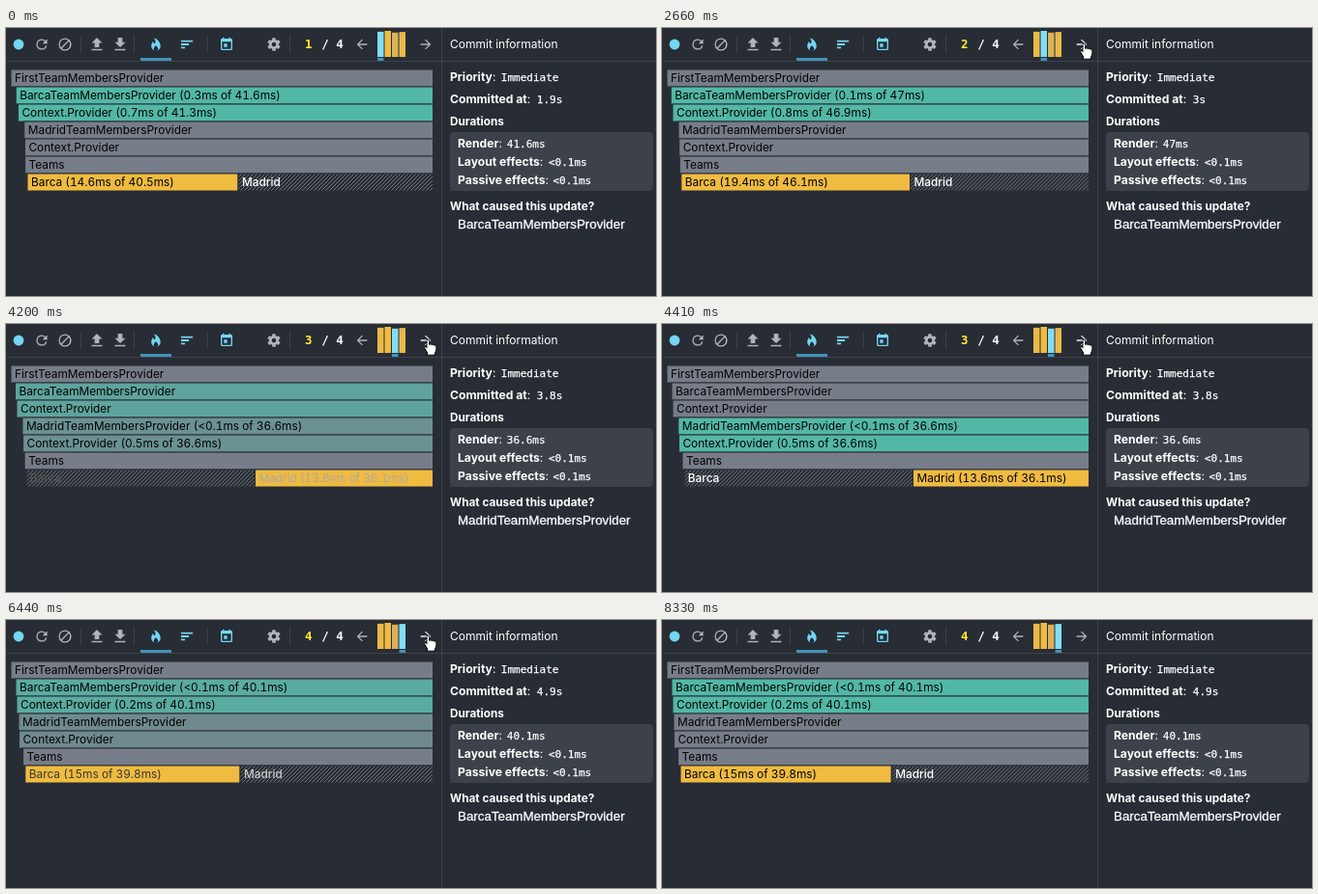
Animation, 672 px wide and 278 px high, one loop 8.68 s. Source, as an HTML page:

```html
<!DOCTYPE html>
<html lang="en">
<head>
<meta charset="utf-8">
<title>Profiler commits</title>
<style>
html, body { margin: 0; width: 100%; height: 100%; overflow: hidden; background: #282c34; }
svg { display: block; }
text { font-family: Inter, Roboto, sans-serif; font-size: 12px; fill: #fff; white-space: pre; }
.row { font-size: 11.83px; font-variant-numeric: tabular-nums; }
.head { font-size: 11.75px; font-weight: 700; }
.key { font-size: 12.15px; font-weight: 700; }
.colon { font-weight: 400; }
.m { font-family: "DejaVu Sans Mono", monospace; font-size: 11px; stroke: #fff; stroke-width: .25; }
.num { font-family: "DejaVu Sans Mono", monospace; font-size: 12.5px; font-weight: 700; }
.cause { font-family: "Liberation Sans", Arial, sans-serif; font-size: 13.333px; stroke: #fff; stroke-width: .3; }
.line { fill: #3d424a; }
.icon { fill: #afb3b9; }
.on { fill: #74d7f6; }
.mark { fill: #3f93b8; }
#index { fill: #ffee2e; }
#chart rect { stroke: #282c34; }
</style>
</head>
<body>
<svg width="672" height="278" viewBox="0 0 672 278">
  <defs>
    <pattern id="dim" patternUnits="userSpaceOnUse" width="4" height="4">
      <path d="M-1 1l2-2M0 4l4-4M3 5l2-2" stroke="#70767f" stroke-width="1"/>
    </pattern>
  </defs>
  <rect width="672" height="278" fill="#282c34"/>
  <g class="line">
    <rect y="34" width="672" height="1"/>
    <rect x="450" width="1" height="278"/>
    <rect x="77" y="8" width="1" height="18"/>
    <rect x="132" y="8" width="1" height="18"/>
    <rect x="208" y="8" width="1" height="18"/>
    <rect x="293" y="8" width="1" height="18"/>
  </g>
  <rect class="mark" x="139" y="31" width="32" height="3"/>
  <circle class="on" cx="13" cy="17" r="5.4"/>
  <g id="icons"></g>
  <text class="num" id="index" x="309" y="21.3"></text>
  <text class="num" x="326.2" y="21.3">/ 4</text>
  <g id="bars"></g>
  <g id="chart"></g>

  <text x="459" y="21.3">Commit information</text>
  <text class="key" x="459" y="55">Priority<tspan class="colon">:</tspan></text>
  <text class="m" x="511.8" y="55">Immediate</text>
  <text class="key" x="459" y="78">Committed at<tspan class="colon">:</tspan></text>
  <text class="m" id="at" x="548.8" y="78"></text>
  <text class="head" x="459" y="101">Durations</text>
  <rect x="459" y="108" width="210" height="61" rx="4" fill="#3d4149"/>
  <text class="key" x="467" y="124.3">Render<tspan class="colon">:</tspan></text>
  <text class="m" id="render" x="517.8" y="124.3"></text>
  <text class="key" x="467" y="143.3">Layout effects<tspan class="colon">:</tspan></text>
  <text class="m" x="561" y="143.3">&lt;0.1ms</text>
  <text class="key" x="467" y="162.3">Passive effects<tspan class="colon">:</tspan></text>
  <text class="m" x="565.5" y="162.3">&lt;0.1ms</text>
  <text class="head" x="459" y="188.5">What caused this update?</text>
  <text class="cause" id="cause" x="467" y="208"></text>

  <path id="hand" fill="#fff" stroke="#000" stroke-linejoin="round" d="M4.3 1C3.4 1 3 1.6 3 2.4V9.6L1.8 8.4C1 7.8 .2 8.5.6 9.4L3.6 15V17.2H11.4V15.2C12.3 13.8 12.9 12 12.9 10.2V8C12.9 6.8 11.3 6.6 10.9 7.4C10.7 6.2 9 6 8.5 6.8C8 5.6 6.2 5.6 5.7 6.6V2.4C5.7 1.6 5.2 1 4.3 1Z" transform="translate(432 15)"/>
  <path id="arrow" fill="#000" stroke="#fff" d="M1 1V14.5L4.2 11.5 6.2 16.5 8.4 15.6 6.4 10.8H10.8Z"/>
</svg>
<script>
const LOOP = 8680, STEP = 70, MOVE = 250;
const ROW = 18, RIGHT = 441.5;
const NS = 'http://www.w3.org/2000/svg';
const $ = id => document.getElementById(id);

function add(parent, tag, attrs) {
  const el = document.createElementNS(NS, tag);
  set(el, attrs);
  return parent.appendChild(el);
}
function set(el, attrs) {
  for (const k in attrs) el.setAttribute(k, attrs[k]);
}

// Icons on a 24-unit grid: centre x, scale, class, path
const icons = [
  [37, .7, 'icon', 'M17.65 6.35A7.96 7.96 0 0 0 12 4a8 8 0 1 0 7.73 10h-2.08A6 6 0 1 1 12 6c1.66 0 3.14.69 4.22 1.78L13 11h7V4z'],
  [61, .66, 'icon', 'M12 2a10 10 0 1 0 0 20 10 10 0 0 0 0-20zM4 12a8 8 0 0 1 12.9-6.31L5.69 16.9A7.9 7.9 0 0 1 4 12zm8 8a7.9 7.9 0 0 1-4.9-1.69L18.31 7.1A8 8 0 0 1 12 20z'],
  [94, .78, 'icon', 'M9 16h6v-6h4l-7-7-7 7h4zM5 18h14v2H5z'],
  [118, .78, 'icon', 'M19 9h-4V3H9v6H5l7 7zM5 18v2h14v-2z'],
  [155, .68, 'on', 'M10.07 21.5C7.14 20.7 5 18.06 5 14.94 5 14 5 9.82 7.83 7.38c0 0-.25 3.82 2.17 3.25 1.12-.3 3-3-1.08-8.13C14.17 3.07 19 9.33 19 14.94c0 3.12-2.14 5.76-5.07 6.56 1.2-.8 1.6-1.7 1.6-2.7 0-1.7-1.6-3-3.53-5.2-1.9 2.2-3.53 3.5-3.53 5.2 0 1 .4 1.9 1.6 2.7z'],
  [187, .68, 'on', 'M3 18.4h6v-2.8H3zM3 5.6v2.8h18V5.6zM3 13.4h12v-2.8H3z'],
  [228, .667, 'on', 'M8 11h5v5H8zM16 1v2H8V1H6v2H5a2 2 0 0 0-2 2v14a2 2 0 0 0 2 2h14a2 2 0 0 0 2-2V5a2 2 0 0 0-2-2h-1V1zm3 18H5V8h14z'],
  [277, .667, 'icon', 'M19.43 12.98a7.8 7.8 0 0 0 0-1.96l2.11-1.65a.5.5 0 0 0 .12-.64l-2-3.46a.5.5 0 0 0-.61-.22l-2.49 1a7.3 7.3 0 0 0-1.69-.98l-.38-2.65A.49.49 0 0 0 14 2h-4a.49.49 0 0 0-.49.42l-.38 2.65c-.61.25-1.17.59-1.69.98l-2.49-1a.5.5 0 0 0-.61.22l-2 3.46a.5.5 0 0 0 .12.64l2.11 1.65a7.9 7.9 0 0 0 0 1.96l-2.11 1.65a.5.5 0 0 0-.12.64l2 3.46c.12.22.39.3.61.22l2.49-1c.52.4 1.08.73 1.69.98l.38 2.65c.03.24.24.42.49.42h4c.25 0 .46-.18.49-.42l.38-2.65c.61-.25 1.17-.59 1.69-.98l2.49 1c.23.09.49 0 .61-.22l2-3.46a.5.5 0 0 0-.12-.64zM12 15.5a3.5 3.5 0 1 1 0-7 3.5 3.5 0 0 1 0 7z'],
  [368, .667, 'icon', 'M20 11H7.83l5.59-5.59L12 4l-8 8 8 8 1.41-1.41L7.83 13H20z'],
  [434, .667, 'icon', 'M4 11h12.17l-5.58-5.59L12 4l8 8-8 8-1.41-1.41L16.17 13H4z']
].map(([x, s, cls, d]) => add($('icons'), 'path', {
  class: cls, d, 'fill-rule': 'evenodd',
  transform: `translate(${x} 17) scale(${s}) translate(-12 -12)`
}));
const next = icons[icons.length - 1];

const names = ['FirstTeamMembersProvider', 'BarcaTeamMembersProvider', 'Context.Provider',
  'MadridTeamMembersProvider', 'Context.Provider', 'Teams', 'Barca', 'Madrid'];
const colors = { g: [119, 125, 136], t: [82, 184, 166], y: [239, 187, 64] };

// kinds: g idle, t light work, y heavy work, d skipped
const commits = [
  { start: 0, at: '1.9s', render: 41.6, kinds: 'gttgggyd', cause: 1,
    left: [5, 10.2, 12.4, 18.8, 19.4, 19.6, 22, 240],
    took: { 1: '0.3ms of 41.6ms', 2: '0.7ms of 41.3ms', 6: '14.6ms of 40.5ms' } },
  { start: 2350, at: '3s', render: 47, kinds: 'gttgggyd', cause: 1,
    left: [5, 9.2, 11, 17, 17.7, 18.2, 19.8, 256.5],
    took: { 1: '0.1ms of 47ms', 2: '0.8ms of 46.9ms', 6: '19.4ms of 46.1ms' } },
  { start: 4100, at: '3.8s', render: 36.6, kinds: 'gggttgdy', cause: 3,
    left: [5, 10, 11, 16.8, 17.4, 21, 22.8, 259.5],
    took: { 3: '<0.1ms of 36.6ms', 4: '0.5ms of 36.6ms', 7: '13.6ms of 36.1ms' } },
  { start: 6270, at: '4.9s', render: 40.1, kinds: 'gttgggyd', cause: 1,
    left: [5, 10, 11, 12, 12.4, 16.6, 19, 237.3],
    took: { 1: '<0.1ms of 40.1ms', 2: '0.2ms of 40.1ms', 6: '15ms of 39.8ms' } }
];

const rows = names.map(() => {
  const group = add($('chart'), 'g', {});
  return {
    group,
    box: add(group, 'rect', { height: ROW }),
    label: add(group, 'text', { class: 'row', x: 4, y: 12.6 })
  };
});

const barFill = ['#eab946', '#efbb40', '#d9b258', '#e8b94b'];
const bars = commits.map((c, i) => {
  const x = 384 + i * 7.5, h = 27 * Math.log(c.render) / Math.log(47);
  return {
    box: add($('bars'), 'rect', { x, y: 30 - h, width: 6.5, height: h }),
    mark: add($('bars'), 'rect', { class: 'mark', x, y: 31, width: 6.5, height: 3 })
  };
});

const mix = (a, b, p) => a + (b - a) * p;

// cubic-bezier(.42, 0, .58, 1)
function ease(x) {
  if (x <= 0) return 0;
  if (x >= 1) return 1;
  let lo = 0, hi = 1;
  for (let i = 0; i < 20; i++) {
    const u = (lo + hi) / 2, v = 1 - u;
    if (1.26 * v * v * u + 1.74 * v * u * u + u * u * u < x) lo = u; else hi = u;
  }
  return lo * lo * (3 - 2 * lo);
}

function fillOf(from, to, p) {
  if (to === 'd') return 'url(#dim)';
  const a = colors[from] || colors[to];
  return `rgb(${colors[to].map((v, i) => Math.round(mix(a[i], v, p)))})`;
}

function drawChart(t) {
  let n = commits.length - 1;
  while (commits[n].start > t) n--;
  const now = commits[n], old = commits[Math.max(0, n - 1)];
  const p = n ? ease((t - now.start) / MOVE) : 1;
  const left = now.left.map((v, i) => mix(old.left[i], v, p));

  rows.forEach(({ group, box, label }, i) => {
    const kind = now.kinds[i], was = old.kinds[i];
    const right = i === 6 ? left[7] : RIGHT;
    set(group, { transform: `translate(${left[i]} ${43 + ROW * Math.min(i, 6)})` });
    set(box, { width: right - left[i], fill: fillOf(was, kind, p) });
    const shade = Math.round(mix(was === 'd' ? 255 : 0, kind === 'd' ? 255 : 0, p));
    label.style.fill = `rgb(${shade},${shade},${shade})`;
    label.style.fontWeight = kind === 'd' ? 500 : 400;
    label.textContent = names[i] + (now.took[i] ? ` (${now.took[i]})` : '');
  });

  bars.forEach(({ box, mark }, i) => {
    set(box, { fill: i === n ? '#80def8' : barFill[i] });
    mark.style.display = i === n ? '' : 'none';
  });
  $('index').textContent = n + 1;
  $('at').textContent = now.at;
  $('render').textContent = now.render + 'ms';
  $('cause').textContent = names[now.cause];
}

const within = (t, a, b) => t >= a && t < b;

function drawPointer(t) {
  const over = within(t, 1890, 8120);
  const down = within(t, 2170, 2310) || within(t, 3990, 4130) || within(t, 6230, 6300);
  next.style.fill = down ? '#a2e9fc' : over ? '#ededed' : '';
  $('hand').style.display = over ? '' : 'none';

  const leaving = within(t, 8120, 8330);
  const q = leaving ? (t - 8120) / 140 : 0;
  const x = leaving ? mix(464, 539, q) : 448;
  const y = leaving ? mix(48, 167, q) : 14;
  $('arrow').style.display = leaving || within(t, 770, 1820) ? '' : 'none';
  set($('arrow'), { transform: `translate(${x} ${y})` });
}

const origin = performance.now();
function frame() {
  const t = Math.floor(((performance.now() - origin) % LOOP) / STEP) * STEP;
  drawChart(t);
  drawPointer(t);
  requestAnimationFrame(frame);
}
frame();
</script>
</body>
</html>
```
